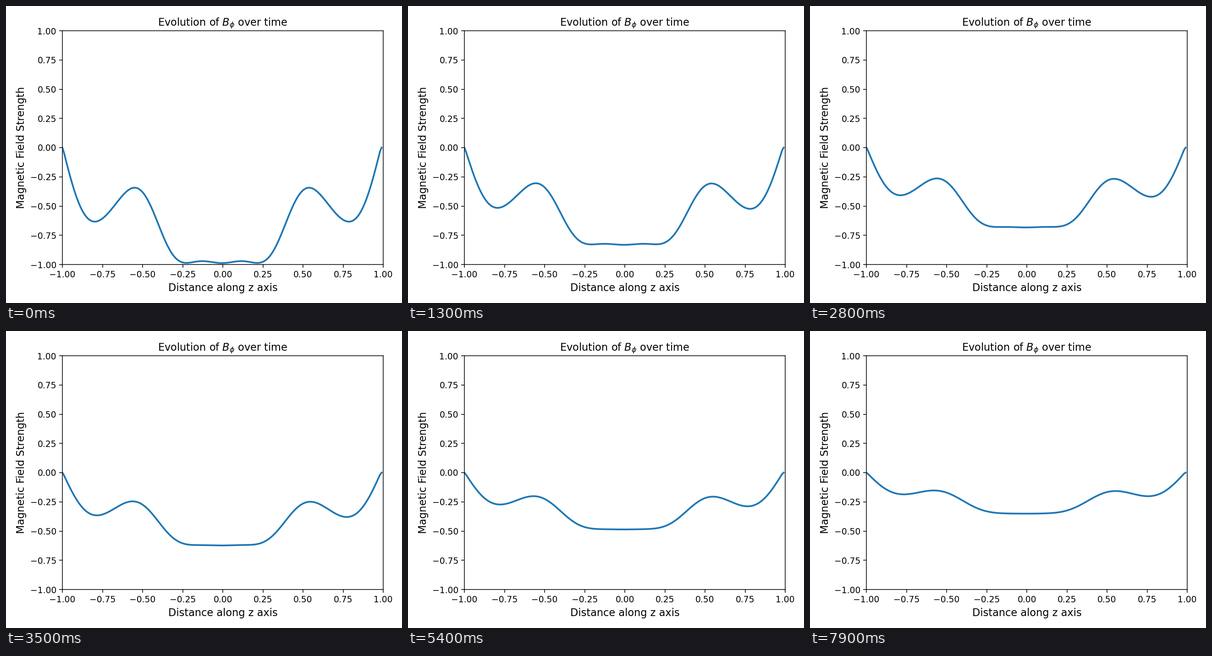
Recreate the animation shown at these times as a matplotlib script. Size 864 px wide and 648 px high, loop 8 s.

```python
import numpy as np
import matplotlib.pyplot as plt
from matplotlib.animation import FuncAnimation

FRAMES, INTERVAL = 80, 100
WIDTH, HEIGHT, DPI = 864, 648, 135

# Odd cosine modes that vanish at both walls
MODES = {1: 0.950, 5: 0.190, 7: -0.197, 9: 0.0085, 11: 0.0155, 13: 0.021}
DAMPING, DIFFUSION = 0.130, 0.00133
SKEW, SKEW_TIME = 0.0046, 1.7

z = -1 + 0.01 * np.arange(200)
s = (z + 0.006) / 0.992


def field(t):
    """Damped, diffusing field with a slowly growing left-right skew."""
    b = sum(a * np.exp(-(DAMPING + DIFFUSION * n * n) * t) * np.cos(n * np.pi * s / 2)
            for n, a in MODES.items())
    skew = SKEW * (1 - np.exp(-t / SKEW_TIME))
    b += skew * np.sin(2 * np.pi * s) * (np.cos(np.pi * s) - 1)
    b[[0, -1]] = 0
    return -b


fig, ax = plt.subplots(figsize=(WIDTH / DPI, HEIGHT / DPI), dpi=DPI)
fig.subplots_adjust(left=123 / WIDTH, right=823 / WIDTH,
                    bottom=1 - 564 / HEIGHT, top=1 - 54 / HEIGHT)
line, = ax.plot(z, field(0), lw=2, color="#1f77b4")
ticks = np.linspace(-1, 1, 9)
ax.set(xlim=(-1, 1), ylim=(-1, 1), xticks=ticks, yticks=ticks)
ax.set_title(r"Evolution of $B_\phi$ over time", fontsize=12)
ax.set_xlabel("Distance along z axis", fontsize=12)
ax.set_ylabel("Magnetic Field Strength", fontsize=12)


def update(i):
    line.set_ydata(field(i * INTERVAL / 1000))
    return line,


anim = FuncAnimation(fig, update, frames=FRAMES, interval=INTERVAL,
                     repeat=True, repeat_delay=0)
plt.show()
```
